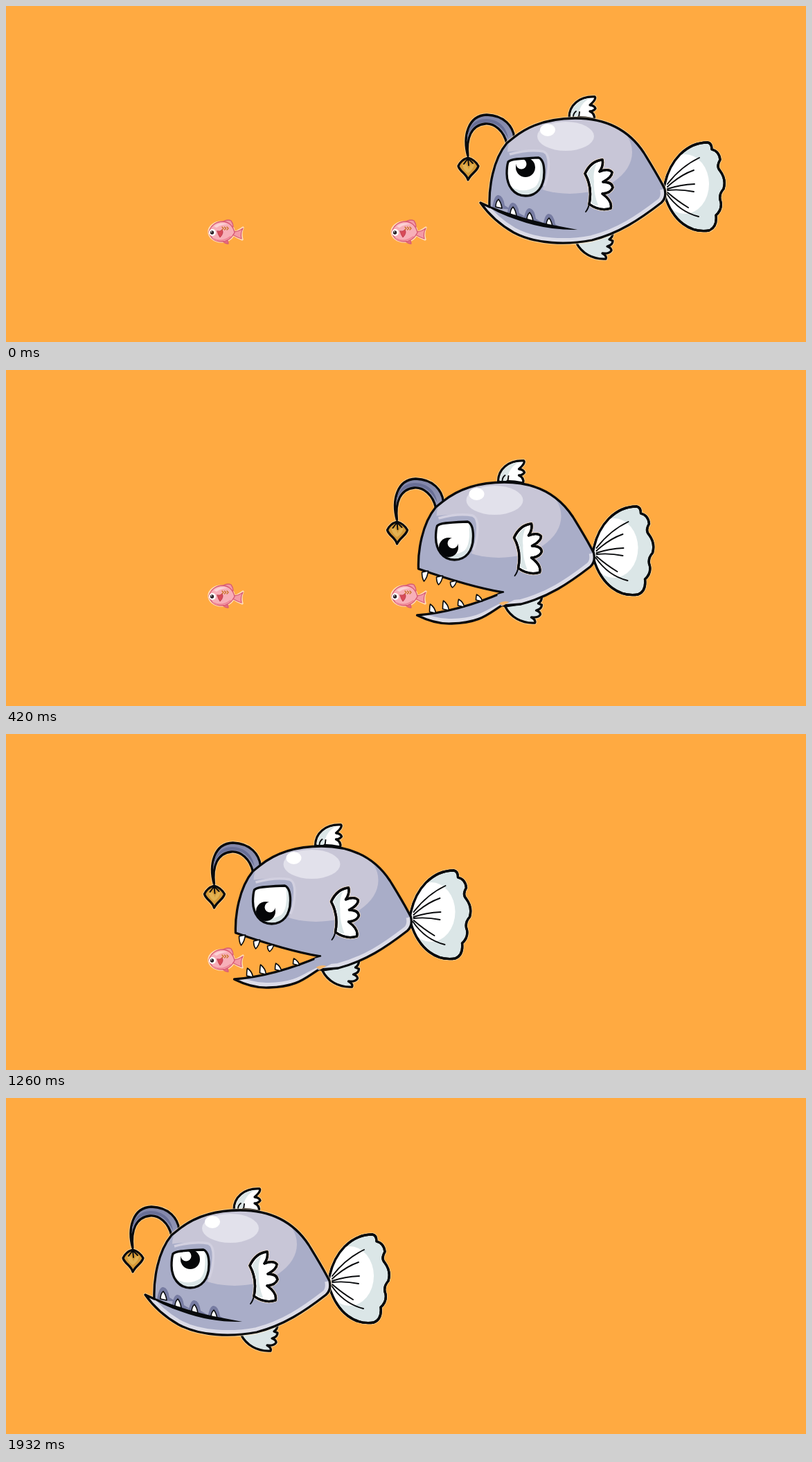
An HTML page for the animation above (2.1 s loop, 1155 by 485 pixels).

```html
<!DOCTYPE html>
<html lang="en">
<head>
<meta charset="utf-8">
<title>Hungry anglerfish</title>
<style>
html, body { margin: 0; width: 100%; height: 100%; overflow: hidden; background: #ffaa41; }
svg { display: block; }
.ink { fill: none; stroke: #080a0c; stroke-width: 3.3; stroke-linejoin: round; stroke-linecap: round; }
.thin { stroke-width: 1.9; }
.halo { fill: none; stroke: #ffe5be; stroke-width: 5.4; stroke-linejoin: round; opacity: .6; }
.tooth { fill: #fff; stroke: #080a0c; stroke-width: 1.6; stroke-linejoin: round; }
</style>
</head>
<body>
<svg width="1155" height="485" viewBox="0 0 1155 485">
  <defs>
    <clipPath id="shutClip"><path id="shutArea"/></clipPath>
    <clipPath id="openClip"><path id="openArea"/></clipPath>
    <clipPath id="jawClip"><path id="jawArea"/></clipPath>
    <clipPath id="tailClip"><path id="tailArea"/></clipPath>
    <clipPath id="eyeClip"><path id="eyeArea"/></clipPath>
    <linearGradient id="rod" x1="0" y1="0" x2="0" y2="1">
      <stop offset="0" stop-color="#8084a8"/><stop offset="1" stop-color="#a0a4c2"/>
    </linearGradient>
    <g id="prey" stroke-linejoin="round" stroke-linecap="round">
      <g fill="none" stroke="#ffdcb8" stroke-width="3.4">
        <ellipse cx="311" cy="326" rx="18" ry="14"/>
        <path d="M328 327Q334 326 342 320Q338 328 341 337Q333 334 328 330Z"/>
      </g>
      <g fill="#f39aa6" stroke="#d85b73" stroke-width="1.3">
        <path d="M328 326Q335 326 342 321Q338 328 340 336Q334 334 327 330Z"/>
        <path d="M311 313Q319 307 325 310Q328 314 328 319Z"/>
        <path d="M312 338Q316 344 321 343Q321 340 319 337Z" fill="#e46a80"/>
        <path d="M293 326C296 316 304 311 313 311C322 312 328 318 330 327C326 335 319 340 311 340C302 340 295 335 293 326Z" fill="#f7afb8"/>
      </g>
      <path d="M300 318Q309 311 320 315Q311 315 304 320Z" fill="#fbd3d6"/>
      <path d="M299 336Q311 342 324 333" fill="none" stroke="#ee8797" stroke-width="2"/>
      <path d="M305 325Q309 326 312 323Q315 328 309 334Q306 330 305 325Z" fill="#d84b58" stroke="#b83347" stroke-width=".8"/>
      <path d="M312 319l2 2-2 2M315.500 319l2 2-2 2M319 319l2 2-2 2" fill="none" stroke="#c97325" stroke-width="1.4"/>
      <circle cx="298" cy="327" r="5" fill="#fff"/>
      <circle cx="297.500" cy="327" r="2.700" fill="#292025"/>
      <circle cx="296.700" cy="326" r=".8" fill="#fff"/>
    </g>
  </defs>
  <rect width="1155" height="485" fill="#ffaa41"/>
  <use id="near" href="#prey" x="264"/>
  <use id="far" href="#prey"/>
  <g id="angler"></g>
</svg>
<script>
const $ = id => document.getElementById(id);
const fill = (d, color) => `<path d="${d}" fill="${color}"/>`;
const ink = (d, extra = '') => `<path class="ink ${extra}" d="${d}"/>`;
const shape = (d, color) => `<path class="halo" d="${d}"/>` + fill(d, color) + ink(d);
const oval = (x, y, rx, ry, color) => `<ellipse cx="${x}" cy="${y}" rx="${rx}" ry="${ry}" fill="${color}"/>`;

const SKIN = '#a9adc8', LIGHT = '#c8c6d7', RIM = '#dcdce8', FIN = '#dbe6e7';

const back = 'C755 172 785 162 822 162C868 162 900 180 921 212C932 230 942 246 951 264Q954 277 946 284C915 308 885 328 846 338';
const brow = 'C697 262 703 222 723 198';
const belly = 'C810 345 765 344 733 327C712 315 697 301 685 284';
const shut = `M733 190${back}${belly}L698 290${brow}Z`;
const gape = `M820 321C785 315 738 301 698 287${brow}L733 190${back}L821 340`;
const jaw = 'M822 338C802 348 792 365 746 366C726 367 708 360 696 354C745 350 790 334 820 321';
const eye = 'M725 225Q728 222 737 221Q758 219 769 219Q777 222 777 240C777 262 766 274 750 274C733 274 723 259 723 242Q723 231 725 225Z';
const tail = 'M950 263C957 222 983 197 1013 197Q1019 198 1019 207Q1030 210 1031 222Q1025 232 1031 238Q1040 250 1036 264Q1028 273 1032 283Q1034 294 1025 302Q1027 319 1015 324C989 328 963 312 951 273Z';
const dorsal = 'M813 161C813 144 827 130 850 131Q853 134 843 143Q850 144 851 148Q848 152 843 152Q851 156 849 163Q831 159 813 161Z';
const pelvic = 'M823 341C831 357 847 366 866 365Q868 361 861 357Q871 358 874 353Q874 349 868 347Q876 345 876 339L871 337Q876 334 876 327Q850 338 823 341Z';
const pectoral = 'M836 242C842 229 850 223 861 222Q863 230 857 239Q870 234 875 240Q875 247 862 254Q875 254 876 262Q873 270 861 271Q876 282 873 292Q858 297 842 286Q847 262 836 242Z';
const rod = 'M723 199C719 180 705 169 692 170C672 172 664 190 667 217C659 188 667 158 694 157C720 158 732 174 734 190Z';
const lure = 'M667 219Q657 222 653 231C655 239 665 242 667 251C671 242 680 239 682 231Q677 222 667 219Z';
const rays = 'M955 257Q974 232 1001 219M955 261Q973 244 993 237M955 264Q973 258 994 257M955 266Q974 264 993 268M955 269Q970 282 985 291M954 271Q972 297 1000 304';

$('shutArea').setAttribute('d', shut);
$('openArea').setAttribute('d', gape + 'Z');
$('jawArea').setAttribute('d', jaw + 'Z');
$('tailArea').setAttribute('d', tail);
$('eyeArea').setAttribute('d', eye);

const fins = shape(tail, FIN)
  + `<g clip-path="url(#tailClip)">${oval(980, 257, 35, 43, '#fff')}</g>` + ink(tail) + ink(rays, 'thin')
  + shape(dorsal, '#fff') + fill('M815 160C816 144 828 134 844 133Q829 139 825 160Z', FIN)
  + ink('M819 160Q819 155 823 152M827 160L828 153', 'thin')
  + shape(pelvic, FIN);

const antenna = shape(rod, 'url(#rod)')
  + fill('M725 191C716 173 705 166 690 168C673 170 667 182 666 195C666 175 676 163 693 163C711 163 723 175 725 191Z', '#696f96');

const sheen = fill('M690 140H970V360H680Z', SKIN)
  + oval(814, 211, 90, 60, LIGHT)
  + fill('M690 216Q745 205 777 210Q784 216 783 235Q781 258 768 274H690Z', SKIN)
  + oval(808, 188, 41, 21, '#e2e1eb') + oval(782, 179, 11, 9, '#fff')
  + `<path d="M727 214Q756 206 776 210Q785 214 783 235Q782 250 777 260" fill="none" stroke="#d2d0e0" stroke-width="3.5"/>`;

const rim = d => `<path d="${d}" fill="none" stroke="${RIM}" stroke-width="14"/>`;

// A tooth of height h above (up = 1) or below (up = -1) its base point.
const tooth = (x, y, h, up, lean = 0) =>
  `<path class="tooth" d="M${x - 4} ${y - up}Q${x - 4} ${y - up * h * .7} ${x + lean} ${y - up * h}Q${x + 4} ${y - up * h * .6} ${x + 5} ${y + up}Z"/>`;

const pupil = (x, y, gx, gy) =>
  fill(eye, '#fff')
  + `<g clip-path="url(#eyeClip)">${fill('M722 255Q742 274 764 261Q775 251 770 215H785V280H720Z', FIN)}`
  + `<circle cx="${x}" cy="${y}" r="14" fill="#050608"/><circle cx="${gx}" cy="${gy}" r="7.5" fill="#fff"/></g>` + ink(eye);

const teeth = [[711, 291], [732, 302], [756, 310], [784, 318]];
const shutHead = `<path class="halo" d="${shut}"/><g clip-path="url(#shutClip)">${sheen}`
  + rim(`M951 264Q954 277 946 284C915 308 885 328 846 338${belly}`)
  + teeth.map(([x, y]) => fill(`M${x - 9} ${y}Q${x - 6} ${y - 19} ${x} ${y - 18}Q${x + 7} ${y - 17} ${x + 9} ${y - 3}L${x + 19} ${y + 3}Z`, '#777ca2')).join('')
  + '</g>' + ink(shut)
  + teeth.map(([x, y]) => tooth(x, y, 12, 1)).join('')
  + fill('M685 283C712 295 745 306 784 315L825 323Q780 324 739 309Q708 299 685 283Z', '#080a0c')
  + pupil(750, 233, 744, 228);

const openHead = `<g clip-path="url(#openClip)">${sheen}`
  + rim('M951 264Q954 277 946 284C915 308 885 328 846 338L815 341') + '</g>'
  + `<g clip-path="url(#jawClip)">${fill(jaw, SKIN)}${rim('M822 342C802 349 792 365 746 366C726 367 708 360 696 354')}</g>`
  + ink(gape) + ink(jaw)
  + fill('M812 324L823 321L836 332L818 341Q812 337 812 324Z', SKIN)
  + fill('M814 337Q821 332 829 335L820 340Z', '#f4b66b')
  + [[707, 291, 14], [728, 298, 12], [748, 305, 9]].map(([x, y, h]) => tooth(x, y, h, -1, -1)).join('')
  + [[718, 350, 12], [737, 346, 13], [759, 341, 10], [785, 333, 9]].map(([x, y, h]) => tooth(x, y, h, 1, -3)).join('')
  + pupil(741.5, 256, 747.5, 250);

const front = shape(pectoral, '#fff')
  + fill('M839 242Q846 230 853 227Q847 240 849 253Q848 270 855 288Q849 288 845 284Q849 262 839 242Z', FIN)
  + ink(pectoral) + ink('M842 285Q841 292 837 297', 'thin')
  + shape(lure, '#d69a37')
  + fill('M659 229Q665 225 668 236Q671 226 676 229Q674 237 667 241Q660 237 659 229Z', '#e3b252')
  + ink('M667 216V220L661 228M667 220L668 230M667 220L674 227', 'thin');

$('angler').innerHTML = fins + antenna
  + `<g id="shut">${shutHead}</g><g id="open">${openHead}</g>` + front;

const HOLD = 420;
const stops = [0, -102.5, -264, -366.5, -484];
const show = (id, on) => $(id).setAttribute('visibility', on ? 'visible' : 'hidden');

function draw(ms) {
  const step = Math.floor(ms / HOLD) % stops.length;
  $('angler').setAttribute('transform', `translate(${stops[step]} 0)`);
  show('shut', step % 2 === 0);
  show('open', step % 2 === 1);
  show('near', step < 2);
  show('far', step < 4);
}

function tick() {
  draw(performance.now());
  requestAnimationFrame(tick);
}
tick();
</script>
</body>
</html>
```
